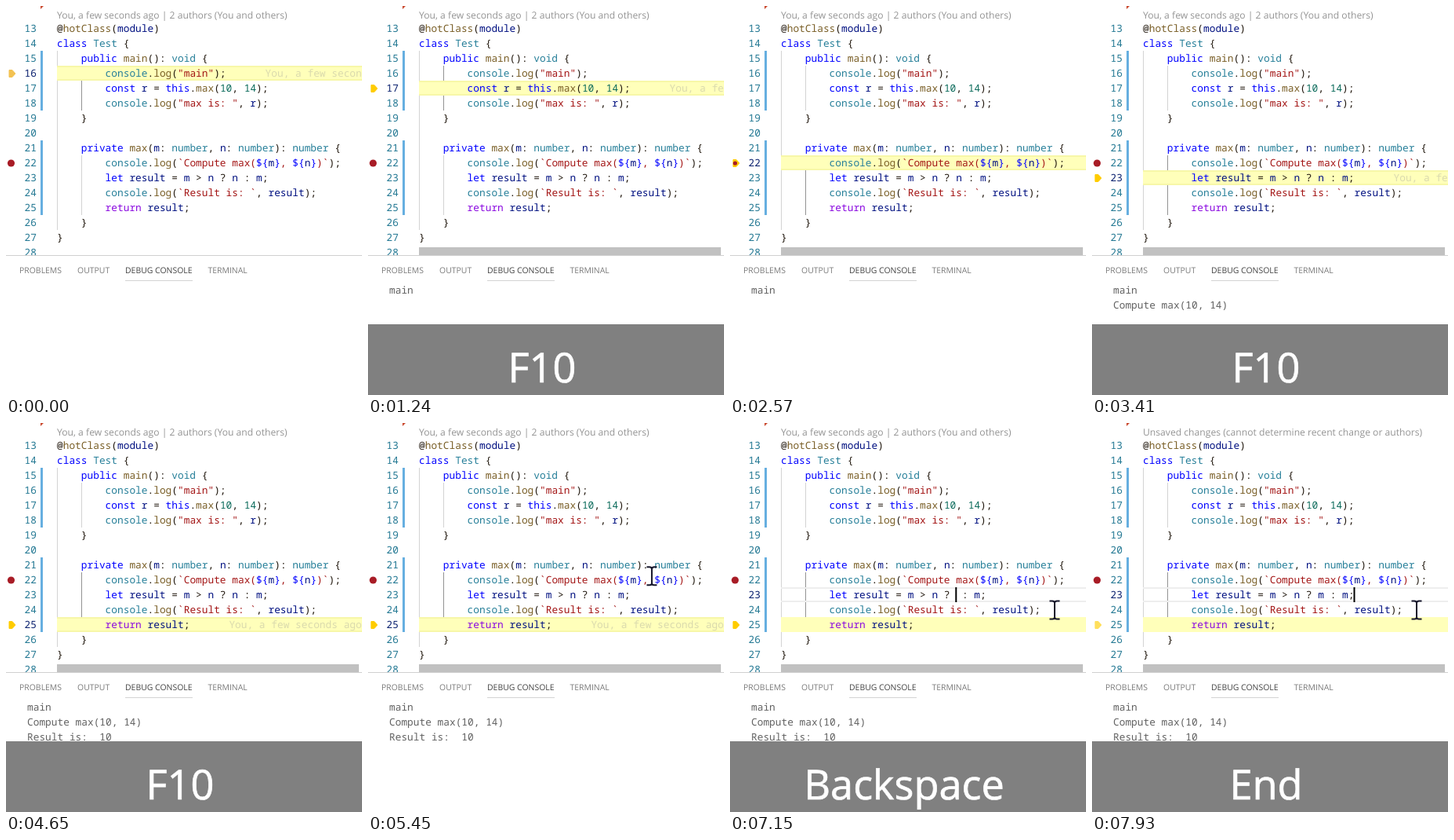
An HTML page that plays this animation: 454 px wide and 495 px high, repeating every 8 s.

```html
<!DOCTYPE html>
<html lang="en">
<head>
<meta charset="utf-8">
<title>Step debugging</title>
<style>
  html, body { margin: 0; width: 100%; height: 100%; overflow: hidden; background: #fff; }
  svg { display: block; width: 454px; height: 495px; }
  text { white-space: pre; text-rendering: geometricPrecision; }
  .code { font: 12.833px "Noto Sans Mono", "DejaVu Sans Mono", monospace; fill: #1f160c; }
  .ui { font-family: "Open Sans", "Noto Sans", sans-serif; }
  .num { fill: #237893; }
  .num.on { fill: #0b216f; }
  .key { fill: #00f; }
  .ctl { fill: #8a08e0; }
  .type { fill: #267f99; }
  .fn { fill: #795e26; }
  .var { fill: #001080; }
  .lit { fill: #0a6a5a; }
  .str { fill: #a31515; }
  .note { fill: #999; fill-opacity: .36; }
  .out { fill: #616161; }
  .guide { fill: #d3d3d3; }
  .guide.on { fill: #939393; }
  .change { fill: #66afe0; }
  .border { fill: #eee; }
  .stop { fill: #ffffba; }
  .stop + .border, .stop + .border + .border { fill: #f7f7a8; }
  .lens { font-size: 12.15px; fill: #949494; }
  .tab { font-size: 10.45px; fill: #7a7a7a; }
  .tab.on { fill: #424242; }
</style>
</head>
<body>
<svg viewBox="0 0 454 495" xmlns="http://www.w3.org/2000/svg">
  <g id="editor"></g>
  <rect id="bar" x="65" y="307" width="385" height="10" fill="#c1c1c1"/>
  <rect y="317" width="454" height="178" fill="#fff"/>
  <rect y="317" width="454" height="1" fill="#d0d0d0"/>
  <g id="panel"></g>
  <g id="overlay">
    <rect y="405" width="454" height="90" fill="#808080"/>
    <text id="keyName" class="ui" x="222" y="479" font-size="52.3" text-anchor="middle"
          fill="#fff" stroke="#fff" stroke-width=".7"></text>
  </g>
  <path id="mouse" d="M-6.5-11.5h3.5q3 0 3 2.5v18q0 2.5-3 2.5h-3.5M6.5-11.5h-3.5q-3 0-3 2.5v18q0 2.5 3 2.5h3.5"
        fill="none" stroke="#15152a" stroke-width="2"/>
</svg>
<script>
const LOOP = 8000, ROW = 19, CH = 7.7, LEFT = 65, WIDTH = 389, FIRST = 13, EDIT = 23;
const CLICK = 5700, ERASE = 6950, TYPE = 7430, END = 7860, NOTE_LAG = 180;
const $ = id => document.getElementById(id);
const rowY = n => (n - FIRST + 1) * ROW;
const colX = c => LEFT + c * CH;
const ramp = (t, from, len) => Math.min(1, Math.max(0, (t - from) / len));

const head = '        let result = m > n ? ';
const source = [
  '@hotClass(module)',
  'class Test {',
  '    public main(): void {',
  '        console.log("main");',
  '        const r = this.max(10, 14);',
  '        console.log("max is: ", r);',
  '    }',
  '',
  '    private max(m: number, n: number): number {',
  '        console.log(`Compute max(${m}, ${n})`);',
  head,
  '        console.log(`Result is: `, result);',
  '        return result;',
  '    }',
  '}',
  ''
];
const output = ['main', 'Compute max(10, 14)', 'Result is:  10'];

// When the debugger halts, and on which line
const stops = [[0, 16], [1020, 17], [1670, 22], [2850, 23], [3570, 24], [4420, 25]];
// Key presses, and the spans during which the key overlay is up
const presses = [[940, 'F10'], [1490, 'F11'], [2800, 'F10'], [6780, 'Backspace'], [END, 'End']];
const shown = [[940, 2500], [2800, 5150], [6780, Infinity]];

const span = (cls, s) => `<tspan class="${cls}">${s}</tspan>`;
const rect = (x, y, w, h, cls) => `<rect x="${x}" y="${y}" width="${w}" height="${h}" class="${cls}"/>`;
const text = (x, y, cls, s, attrs = '') => `<text x="${x}" y="${y}" class="${cls}" ${attrs}>${s}</text>`;

const rules = [
  [/^[`"]/, s => span('str', s.replace(/\$\{(\w+)\}/g, (_, v) =>
    span('key', '${') + span('var', v) + span('key', '}')))],
  [/^(class|public|private|const|let|this)$/, s => span('key', s)],
  [/^return$/, s => span('ctl', s)],
  [/^(void|number|Test|console)$/, s => span('type', s)],
  [/^(hotClass|main|log|max)$/, s => span('fn', s)],
  [/^\d/, s => span('lit', s)],
  [/./, s => span('var', s)]
];
const paint = s => s.replace(/>/g, '&gt;').replace(/`[^`]*`|"[^"]*"|&gt;|\w+/g, w =>
  w === '&gt;' ? w : rules.find(r => r[0].test(w))[1](w));

function stateAt(t) {
  const index = stops.filter(s => s[0] <= t).length - 1;
  const [halted, line] = stops[index];
  const clicked = t >= CLICK;
  const cursor = clicked ? EDIT : line;
  const since = t - (clicked ? CLICK : halted);
  const noted = (index === 0 || since >= NOTE_LAG) && t < presses[3][0];
  const typed = t < ERASE ? 'n' : t < TYPE ? '' : 'm';
  const edited = head + typed + ' : m;';
  const blink = clicked && (since < 500 || t >= presses[3][0]);
  return {
    line, cursor, edited,
    note: noted ? cursor : 0,
    caret: blink ? (t < END ? (head + typed).length : edited.length) : 0,
    lines: Math.ceil(index / 2),
    arrow: t < stops[1][0] ? '#f3c252' : t < END ? '#ffcc00' : '#ffdf5c',
    lens: t < END + 70 ? 'You, a few seconds ago | 2 authors (You and others)'
      : 'Unsaved changes (cannot determine recent change or authors)'
  };
}

function guides(cursor) {
  const block = (a, b) => rect(96, rowY(a), 1, (b - a + 1) * ROW,
    'guide' + (cursor >= a && cursor <= b ? ' on' : ''));
  return rect(LEFT, rowY(15), 1, 12 * ROW, 'guide') + block(16, 18) + block(22, 25);
}

function gutter(s) {
  const y = rowY(s.line) + 10;
  const dot = r => `<circle cx="6.5" cy="${rowY(22) + 10}" r="${r}" fill="#a81c26"/>`;
  const arrow = `<path d="M4 ${y - 4.5}h4l4 4.5l-4 4.5h-4z" fill="${s.arrow}" stroke="${s.arrow}" stroke-linejoin="round"/>`;
  return rect(44, rowY(15), 3, 4 * ROW, 'change') + rect(44, rowY(21), 3, 5 * ROW, 'change') +
    '<path d="M44 0h4l-4 4z" fill="#ca4b31"/>' +
    (s.line === 22 ? arrow + dot(2.6) : dot(4.6) + arrow);
}

function editor(s) {
  const cy = rowY(s.cursor);
  const border = rect(LEFT, cy, WIDTH, 2, 'border') + rect(LEFT, cy + 17, WIDTH, 2, 'border');
  const stop = rect(LEFT, rowY(s.line), WIDTH, ROW, 'stop');
  let svg = guides(s.cursor) + (s.cursor === s.line ? stop + border : border + stop) +
    gutter(s) + text(LEFT, 16.4, 'ui lens', s.lens);
  source.forEach((raw, i) => {
    const n = FIRST + i, y = rowY(n) + 14;
    const line = n === EDIT ? s.edited : raw;
    const body = line.trimStart();
    svg += text(39, y, 'code num' + (n === s.cursor ? ' on' : ''), n, 'text-anchor="end"');
    if (body) svg += text(colX(line.length - body.length), y, 'code', paint(body));
    if (n === s.note) svg += text(colX(line.length) + 50, y, 'code note', 'You, a few seconds ago');
  });
  return svg + (s.caret ? rect(colX(s.caret) - 1, rowY(EDIT), 2, ROW, '') : '');
}

function panel(s) {
  const tabs = [[17, 'PROBLEMS'], [91, 'OUTPUT'], [152, 'DEBUG CONSOLE'], [257.5, 'TERMINAL']];
  return tabs.map(([x, name], i) => text(x, 340, 'ui tab' + (i === 2 ? ' on' : ''), name)).join('') +
    rect(152, 349, 86, 1, 'guide') +
    output.slice(0, s.lines).map((o, i) => text(27, 366 + i * ROW, 'code out', o)).join('');
}

function moveMouse(t) {
  const enter = ramp(t, 5210, 410), leave = ramp(t, 6120, 280);
  $('mouse').style.opacity = enter > 0 ? 1 : 0;
  const x = 446 - 143 * enter + 111 * leave;
  const y = 163 + 54 * enter + 21 * leave;
  $('mouse').setAttribute('transform', `translate(${x} ${y})`);
}

let last = '';
function draw(t) {
  const s = stateAt(t), key = JSON.stringify(s);
  if (key !== last) {
    last = key;
    $('editor').innerHTML = editor(s);
    $('panel').innerHTML = panel(s);
  }
  const press = presses.filter(p => p[0] <= t).pop();
  $('keyName').textContent = press ? press[1] : '';
  $('overlay').style.opacity = Math.max(...shown.map(([a, b]) => Math.min(ramp(t, a, 150), 1 - ramp(t, b - 160, 160))));
  $('bar').style.opacity = ramp(t, 150, 480);
  moveMouse(t);
}

const start = performance.now();
function tick() {
  draw((performance.now() - start) % LOOP);
  requestAnimationFrame(tick);
}
tick();
</script>
</body>
</html>
```
